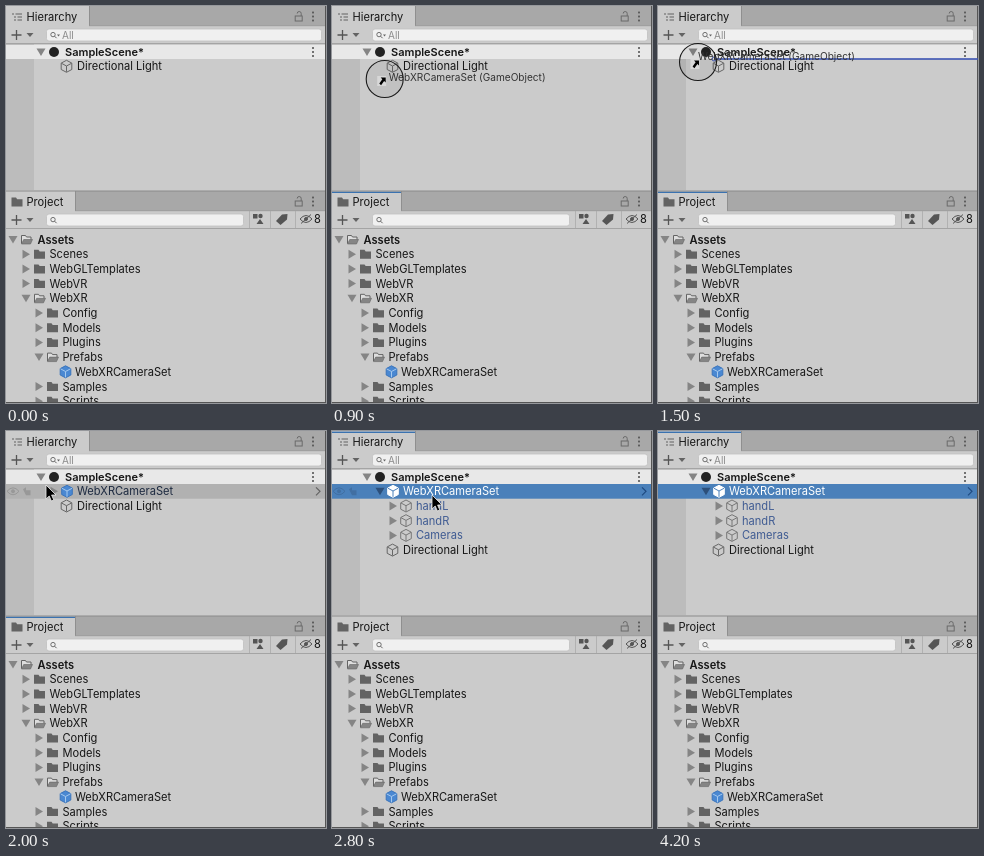
An HTML page for the animation above (4400 ms loop, 320 by 397 pixels).

```html
<!DOCTYPE html>
<html lang="en">
<head>
<meta charset="utf-8">
<title>Prefab drag and drop</title>
<style>
  html, body { margin: 0; width: 100%; height: 100%; overflow: hidden; background: #cbcbcb; }
  svg { display: block; width: 320px; height: 397px; font: 11.1px Inter, sans-serif; }
  text { white-space: pre; }
</style>
</head>
<body>
<svg id="stage" viewBox="0 0 320 397"></svg>
<script>
const LOOP = 4400, STEP = 100, ROW = 14.7;
const PRESS = 300, DROP = 1800, EXPAND = 2200, SELECT = 2600;
const BLUE = '#4a80ba', INK = '#161616', GREY = '#636363', ACCENT = '#3d55b4';

// time, pointer x, pointer y
const pointerKeys = [
  [100, 140, 392], [300, 112, 364], [400, 111, 350], [600, 105, 292], [900, 52.7, 73],
  [1400, 41, 57], [1500, 40, 56], [1800, 40, 55], [2000, 40, 55], [2200, 46, 59],
  [2600, 95, 65], [2800, 100, 65], [3100, 108, 72], [3500, 190, 130], [3900, 190, 130], [4200, 330, 170]
];
// time, drag label offset from the pointer
const labelKeys = [[300, 4, 15], [600, 4, 15], [900, 4, -2], [1500, 0, -6], [1800, 0, -6]];

function at(keys, t) {
  let i = keys.findIndex(k => k[0] >= t);
  if (i < 0) i = keys.length - 1;
  const b = keys[i], a = keys[Math.max(0, i - 1)];
  const u = a === b ? 1 : Math.min(1, (t - a[0]) / (b[0] - a[0]));
  return [1, 2].map(n => a[n] + (b[n] - a[n]) * u);
}

const rect = (x, y, w, h, fill, extra = '') =>
  `<rect x="${x}" y="${y}" width="${w}" height="${h}" fill="${fill}" ${extra}/>`;
const path = (x, y, d, fill, stroke = 'none', width = 1) =>
  `<path transform="translate(${x} ${y})" d="${d}" fill="${fill}" stroke="${stroke}" stroke-width="${width}"/>`;
const ring = (x, y, r, stroke, width = 1, fill = 'none') =>
  `<circle cx="${x}" cy="${y}" r="${r}" fill="${fill}" stroke="${stroke}" stroke-width="${width}"/>`;
// y is the vertical middle of the line
const text = (x, y, s, fill = INK, extra = '') =>
  `<text x="${x}" y="${y + 4}" fill="${fill}" ${extra}>${s}</text>`;

const triangle = (x, y, open, fill = '#858585') =>
  path(x, y, open ? 'M-4.5-3.5h9L0 4z' : 'M-3.5-4.5v9L4 0z', fill);
const cube = (x, y, stroke, fill = 'none', edge = stroke) =>
  path(x, y, 'M0-6L5.3-3.2V3.2L0 6L-5.3 3.2V-3.2z', fill, stroke) +
  path(x, y, 'M-5-3L0-.3L5-3M0-.3V5.5', 'none', edge);
const prefab = (x, y, selected) =>
  selected ? cube(x, y, '#fff', '#fff', BLUE) : cube(x, y, '#3a74bb', '#4a88d2', '#a5c9ee');
const folder = (x, y, open) => open
  ? path(x, y, 'M-5 4V-4h4l1 1.5h4.5V0', '#dedede', GREY) +
    path(x, y, 'M-5 4.5L-2.8 0h8.8L4 4.5z', '#858585', GREY, .6)
  : path(x, y, 'M-5.5 4.5v-9h4.5l1.2 1.7h5.3v7.3z', GREY);
const dots = (x, y) => [-4, 0, 4].map(d => rect(x - .9, y + d - .9, 1.8, 1.8, '#555')).join('');
const lock = (x, y) => rect(x - 3.5, y - .5, 7, 5, 'none', 'stroke="#6a6a6a"') +
  path(x, y, 'M-1.5-3a2 2 0 0 1 4 0V-.5', 'none', '#6a6a6a');
const eye = (x, y, color) =>
  path(x, y, 'M-6 0Q0-7 6 0Q0 7-6 0z', 'none', color) + ring(x, y, 1.5, color, 1, color);

function panel(y, title, tabWidth, focused, searchEnd) {
  const mid = y + 29;
  return rect(0, y, 320, 20, '#a8a8a8') + rect(0, y, tabWidth, 21, '#cbcbcb') +
    rect(tabWidth, y, 1, 20, '#8f8f8f') + rect(tabWidth, y + 19.5, 320, .7, '#999') +
    (focused ? rect(0, y + .6, tabWidth, 1.4, '#3a72b0') : '') +
    text(20.5, y + 11, title) + lock(292.7, y + 10.5) + dots(307, y + 10.5) +
    path(10.5, mid, 'M-5 0H5M0-5V5', 'none', '#555', 1.3) +
    path(24, mid, 'M-3.5-2h7L0 2z', GREY) +
    rect(40.5, mid - 6, searchEnd - 40, 12, '#f0f0f0', 'rx="2.5" stroke="#c0c0c0" stroke-width=".8"') +
    ring(47, mid - .4, 2.2, GREY, .9) + path(47, mid, 'M1.6 1.2l2 2', 'none', GREY) +
    rect(0, y + 37, 320, 1, '#a4a4a4');
}

function hierarchy(t, pointer) {
  const focused = t >= EXPAND, added = t >= DROP, expanded = t >= EXPAND + 100, selected = t >= SELECT;
  const hovered = added && pointer[1] > 53 && pointer[1] < 68 && pointer[0] < 320;
  let out = panel(0, 'Hierarchy', 83, focused, 315) +
    path(11, 11, 'M-5-3h2M-1.5-3H5M-3 0h2M.5 0H5M-3 3h2M.5 3H5', 'none', GREY, 1.1) +
    path(52.5, 29.5, 'M-1.5-1h3L0 1z', GREY) + text(56, 29, 'All', '#8c8c8c', 'font-size="10"') +
    rect(0, 38, 28, 146, '#bcbcbc') + rect(0, 39, 320, 14, '#e8e8e8') +
    triangle(35, 46, true) + ring(48, 46, 5, 'none', 0, '#222') +
    text(59, 45.5, 'SampleScene*', INK, 'font-weight="600" font-size="11"') + dots(307, 46);
  let y = 60.3;
  if (added) {
    if (selected) out += rect(0, 53, 320, ROW, BLUE);
    else if (hovered) out += rect(0, 53, 320, ROW, '#b1b1b1');
    if (hovered) {
      const faint = selected ? '#416fa2' : '#989898';
      out += eye(7, y, faint) + path(21, y, 'M-4-2L-1 4H3.5V-1H-1V-4z', faint);
    }
    out += triangle(48, y, expanded, selected ? '#2c4f7a' : undefined) + prefab(61, y, selected) +
      text(71, y, 'WebXRCameraSet', selected ? '#fff' : '#1d2a40') +
      path(312, y, 'M-2-4L2 0L-2 4', 'none', selected ? '#1f4a80' : GREY, 1.2);
    y += ROW;
    if (expanded) for (const name of ['handL', 'handR', 'Cameras']) {
      out += triangle(61, y) + cube(74, y, '#777') + text(84, y, name, '#3f5b92');
      y += ROW;
    }
  }
  return out + cube(60.5, y, '#666') + text(71, y, 'Directional Light');
}

// name, depth, open
const assets = [
  ['Assets', 0, true], ['Scenes', 1], ['WebGLTemplates', 1], ['WebVR', 1], ['WebXR', 1, true],
  ['Config', 2], ['Models', 2], ['Plugins', 2], ['Prefabs', 2, true],
  ['WebXRCameraSet', 3], ['Samples', 2], ['Scripts', 2]
];

function project(t, pointer) {
  const picked = t >= PRESS && t < DROP && pointer[1] > 185;
  let out = panel(185, 'Project', 69, t >= PRESS && t < EXPAND, 237) +
    rect(0, 184.5, 320, 1, '#8c8c8c') + folder(11, 196) +
    [243, 264, 289].map(x => rect(x, 205, .8, 17, '#aaa')).join('') +
    path(252, 213, 'M-5-5h4.5v4.5h-4.5zM2 0L5.5 5H-1.5z', '#555') + ring(254.5, 210, 2.2, 'none', 0, '#555') +
    path(276, 213, 'M-6 2L0-4.5l5.5-.5L5 .5L-1.5 6z', '#555') +
    eye(300, 213, '#555') + path(300, 213, 'M-5 4.5L5-4.5', 'none', '#555') + text(308, 213, '8');
  assets.forEach(([name, depth, open], i) => {
    const x = 7 + depth * 13, y = 233.5 + i * ROW, leaf = depth === 3;
    if (leaf) {
      if (picked) out += rect(0, y - 7.3, 320, ROW, BLUE);
      out += prefab(59.5, y, picked);
    } else {
      out += triangle(x, y, open) + folder(x + 13.5, y, open);
    }
    out += text(leaf ? 69 : depth ? x + 23.5 : 31.5, y, name, leaf && picked ? '#fff' : INK,
      depth ? '' : 'font-weight="600"');
  });
  return out;
}

const frameEdges = rect(319, 0, 1, 397, '#555') + rect(0, 396, 320, 1, '#555');
const dropLine = (x, y) => rect(x + 2, y - .8, 318 - x, 1.6, ACCENT) + ring(x, y, 2, ACCENT);

function pointerLayer(t, [x, y]) {
  if (t < 100 || t >= 4200) return '';
  const dragging = t > PRESS && t < DROP, overScene = dragging && y < 185;
  let out = '';
  if (dragging) {
    const [dx, dy] = at(labelKeys, t);
    if (t >= 1300) out += dropLine(56, 53);
    else if (y > 240) out += dropLine(40, 241 + Math.round((y + 22 - 241) / ROW) * ROW);
    out += text(x + dx, y + dy - .5, 'WebXRCameraSet (GameObject)', '#333', 'font-size="10.1"');
  }
  if (t >= PRESS && t < DROP || t === EXPAND || t === SELECT) {
    out += ring(x, y, overScene ? 18.5 : 19.5, '#1a1a1a', 1.1, 'rgba(0,0,0,.05)');
  }
  return out + (overScene
    ? rect(x - 7.5, y - 3, 9, 10, '#d8d8d8') +
      path(x, y, 'M-4-1.5H1V3.5L-.6 2L-3.6 6.2L-5.4 4.4L-2.4 .2z', '#000')
    : path(x, y, 'M0-1V13L3.2 10L5.4 15L7.8 14L5.6 9H10z', '#000', '#eee', .8));
}

const stage = document.getElementById('stage');
let shown = -1;
function frame() {
  const t = Math.floor(performance.now() % LOOP / STEP) * STEP;
  if (t !== shown) {
    const pointer = at(pointerKeys, t);
    stage.innerHTML = project(t, pointer) + hierarchy(t, pointer) + frameEdges + pointerLayer(t, pointer);
    shown = t;
  }
  requestAnimationFrame(frame);
}
frame();
</script>
</body>
</html>
```
